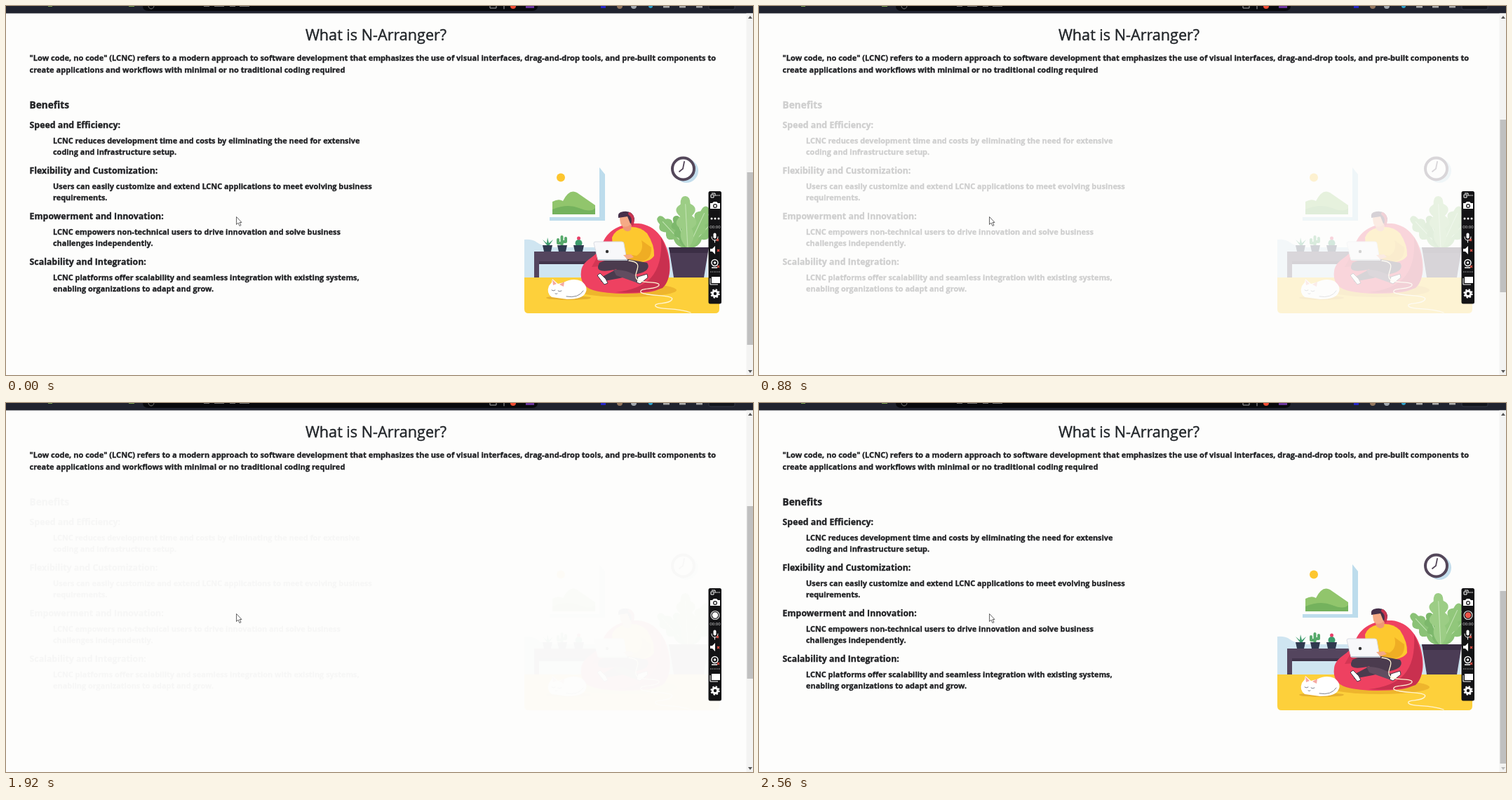
An HTML page for the animation above (2.6 s loop, 1065x526 px).

```html
<!DOCTYPE html>
<html lang="en">
<head>
<meta charset="utf-8">
<title>What is N-Arranger?</title>
<style>
html, body { margin: 0; width: 100%; height: 100%; overflow: hidden; background: #fdfdfc; }
svg { display: block; width: 1065px; height: 526px; }
text { font-family: "Open Sans", "Noto Sans", sans-serif; font-size: 10.54px; fill: #43464a; white-space: pre; }
.b, .h, .big { font-weight: 700; fill: #212225; stroke: #212225; stroke-width: .35px; }
.b { font-size: 10.93px; }
.lead { font-size: 11.08px; }
.h { font-size: 12.37px; }
.big { font-size: 13.7px; }
.title { font-size: 21.6px; fill: #212529; stroke: #212529; stroke-width: .4px; text-anchor: middle; }
.line { fill: none; stroke-linecap: round; stroke-linejoin: round; }
</style>
</head>
<body>
<svg viewBox="0 0 1065 526">
  <rect width="1065" height="526" fill="#fdfdfc"/>

  <!-- browser edge -->
  <rect width="1065" height="10.5" fill="#20232f"/>
  <path d="M195 0H758Q758 7 750 7H203Q195 7 195 0Z" fill="#08090d"/>
  <path d="M203 0a4 4 0 0 0 8 0" class="line" stroke="#777"/>
  <path d="M282 0h8M297 0h14M319 0h8M333 0h14" stroke="#777" stroke-width="2"/>
  <path d="M60 0h6M175 0h8" stroke="#7ca653" stroke-width="2"/>
  <path d="M690 0v3h9V0M710 0v4" class="line" stroke="#aaa"/>
  <circle cx="723" cy="0" r="4" fill="#ef4b32"/>
  <rect x="741" width="12" height="3" fill="#69349b"/>
  <rect x="848" width="7" height="3" fill="#2626c8"/>
  <circle cx="875" cy="0" r="4" fill="#94775e"/>
  <circle cx="895" cy="0" r="4" fill="#a2a8af"/>
  <circle cx="919" cy="0" r="3" fill="#2ba1cc"/>
  <path d="M937 1h9M960 1h9M984 1h9" stroke="#aaa" stroke-width="3"/>
  <path d="M1002 0v3q0 2 3 2h31q3 0 3-2V0" fill="#11141c" stroke="#343846"/>

  <text class="title" x="527.5" y="49">What is N-Arranger?</text>
  <text class="b lead" x="33.5" y="78">"Low code, no code" (LCNC) refers to a modern approach to software development that emphasizes the use of visual interfaces, drag-and-drop tools, and pre-built components to</text>
  <text class="b lead" x="33.5" y="94.7">create applications and workflows with minimal or no traditional coding required</text>

  <g id="benefits">
    <g id="benefitText"></g>
    <path d="M739 333Q750 332 757 337T778 344H1000V390H739Z" fill="#cfe5f1"/>
    <path d="M739 387H1017V432Q1017 438 1011 438H745Q739 438 739 432Z" fill="#fdd03b"/>
    <!-- wall picture and clock -->
    <path d="M775 306V301H846V230L854 240V306Z" fill="#bddcec"/>
    <path d="M779 297V279Q788 274 794 278Q803 260 814 266L840 284V297Z" fill="#91c56c"/>
    <path d="M779 290Q800 281 817 288T840 288V297H779Z" fill="#74b25d"/>
    <circle cx="791" cy="244.500" r="6" fill="#fdc62f"/>
    <circle cx="970" cy="235" r="17" fill="#c3deed"/>
    <circle cx="965.500" cy="232" r="15.500" fill="#fff" stroke="#54475a" stroke-width="4"/>
    <path d="M967 222L965 232L960 236" class="line" stroke="#54475a" stroke-width="1.800"/>
    <!-- plant -->
    <g id="plant"></g>
    <path d="M945 344H1002L995 387H952Z" fill="#4b3c55"/>
    <path d="M945 344H1002L1000 352H947Z" fill="#3b2e45"/>
    <!-- shelf -->
    <path d="M753 350H842V364H760V387H753Z" fill="#54455e"/>
    <path d="M760 364H842V368H760Z" fill="#41354b"/>
    <path d="M772 342l-7-9 6 5 1-8 2 8 6-5-6 9Z" fill="#3c9a6b"/>
    <path d="M792.500 342V329M793 338h-6v-5M793 336h5v-5" class="line" stroke="#57a96b" stroke-width="4"/>
    <circle cx="816.500" cy="338" r="5" fill="#3c9a6b"/>
    <circle cx="816.500" cy="331" r="2.500" fill="#e93f68"/>
    <path d="M765 341h14l-2 9h-10ZM786 341h14l-2 9h-10ZM809 341h15l-2 9h-11Z" fill="#30394f"/>
    <!-- bean bag -->
    <ellipse cx="884" cy="405" rx="72" ry="10" fill="#eeb52d"/>
    <path d="M820 378C822 361 842 359 849 342C857 317 880 309 902 310C926 312 943 334 946 363C949 390 940 405 916 408C891 411 857 411 837 405C824 401 818 391 820 378Z" fill="#ee4161"/>
    <path d="M934 330C949 360 950 390 936 402Q913 411 869 408C914 403 937 384 934 330Z" fill="#c9304f"/>
    <path d="M849 347Q859 337 874 338L860 370L835 372Z" fill="#d43654"/>
    <!-- reader -->
    <path d="M864 330Q868 319 882 316Q902 312 914 324Q925 341 924 356Q919 365 898 366L866 360Z" fill="#fdc82f"/>
    <path d="M906 334Q910 349 899 356L879 353L879 360L904 364Q921 363 920 344Z" fill="#efad24"/>
    <path d="M877 305h16l-2 14q-6 5-11-1Z" fill="#ef9876"/>
    <path d="M875 300Q877 295 887 297L893 307Q888 317 879 314Q875 312 875 300Z" fill="#f5aa86"/>
    <path d="M873 302Q871 294 880 293Q893 291 896 303Q895 313 890 310L886 300Z" fill="#46304a"/>
    <path d="M889 296Q896 301 893 311" class="line" stroke="#c83450" stroke-width="4"/>
    <path d="M846 366Q862 358 887 361L914 366Q921 377 900 382L875 388L848 393L850 386L871 375Q842 382 844 371Z" fill="#4b3b4e"/>
    <path d="M866 376Q889 375 908 391L901 395L870 384Z" fill="#614d60"/>
    <path d="M847 381l8 8 3 6-5 2-10-13ZM901 386l13-4 1 5-11 9-5-2Z" fill="#fff" stroke="#443645"/>
    <path d="M838 338Q838 336 841 336H878Q881 336 881 339L885 362H844Z" fill="#f8f8fa" stroke="#d9dbe2"/>
    <path d="M844 361H886V363H846Z" fill="#b9c1cb"/>
    <circle cx="857" cy="350" r="2.200" fill="#333"/>
    <path d="M880 355l11-1 4 4-9 3Z" fill="#f5aa86"/>
    <path d="M888 363C914 366 891 381 900 390C906 396 933 392 931 398C928 405 902 401 905 408C910 414 956 411 949 419C944 426 923 422 926 428C932 434 955 429 976 437" class="line" stroke="#fff4d2" stroke-width="1.300"/>
    <!-- cat -->
    <ellipse cx="802" cy="416" rx="32" ry="3" fill="#e6b12f"/>
    <path d="M774 399L778 394L779 389L787 396L795 394Q808 387 820 392Q831 400 826 409Q822 418 800 418L778 415Q770 409 774 399Z" fill="#fff"/>
    <path d="M779 390l1 8 5-2ZM789 397l7-4-1 7Z" fill="#f5a9a1"/>
    <path d="M778 405q2 2 5 0M787 406q2 2 5 0M783 410q2 1 3 0M799 414Q816 417 823 406" class="line" stroke="#737782" stroke-width=".9"/>
  </g>

  <g id="features">
    <g id="featureText"></g>
    <ellipse cx="860" cy="319" rx="82" ry="88" fill="#d9effc"/>
    <path d="M878 247C860 266 852 271 839 271C819 271 808 260 808 247C808 233 820 223 839 223C853 223 861 230 878 247" class="line" stroke="#7edbd0" stroke-width="8"/>
    <path d="M863 261C892 233 899 223 917 223C936 223 948 233 948 247C948 260 935 271 917 271C903 271 895 264 878 247" class="line" stroke="#83baf3" stroke-width="8"/>
    <!-- floating panels -->
    <path d="M740 304Q740 301 744 301L782 300Q785 300 786 303L792 318Q792 321 789 321H749Q747 321 746 318Z" fill="#2bbfc3"/>
    <circle cx="755" cy="308" r="4" fill="#287dc3"/>
    <path d="M749 316q6-7 13 0ZM766 307h17M768 312h17M769 317h15" fill="#287dc3" stroke="#d3f7f2"/>
    <path d="M758 328L795 326L808 362L772 363Z" fill="#f9a72e"/>
    <path d="M763 334h31M766 341h31M769 348h31M773 355h31M775 328l13 34M785 327l13 35" stroke="#fff0cd" stroke-width="1.500"/>
    <path d="M804 337L824 334L833 359L811 361Z" fill="#267dcc"/>
    <path d="M826 337L851 335L861 358L834 360Z" fill="#ffb442"/>
    <path d="M810 342l14-2M812 347l14-1M831 342l19-2M834 348l19-2M836 354l20-1" stroke="#fff" stroke-width="1.500"/>
    <path d="M840 318L862 315L868 328L846 330Z" fill="#faad36"/>
    <path d="M857 335L882 332L891 357L867 359Z" fill="#38b8c7"/>
    <path d="M863 340l18-2M866 347l18-2M869 353l18-2" stroke="#e2ffff" stroke-width="1.500"/>
    <path d="M833 310Q825 305 833 299Q834 291 843 294Q851 291 855 299Q866 300 864 307Q863 312 855 312Z" fill="#36c6bb"/>
    <g id="gears" class="line"></g>
    <!-- desk -->
    <path d="M750 373L925 367L990 378V391H822L751 385Z" fill="#86c2f0"/>
    <path d="M751 374L822 382V438H751Z" fill="#5aa4e4"/>
    <path d="M822 383H829V438H822Z" fill="#397fc2"/>
    <path d="M962 388H990V438H962Z" fill="#79b9eb"/>
    <path d="M783 369L834 360L894 363L912 376L833 382Z" fill="#6f61c7"/>
    <path d="M791 369L834 363L889 365L901 374L834 378Z" fill="#a69cec"/>
    <path d="M798 369l84 5M810 367l77 5M822 365l71 5M812 374l40-10M835 376l43-11" stroke="#766ac5" stroke-width="1.100"/>
    <path d="M783 369L833 382L912 376V379L833 385L783 372Z" fill="#4c409b"/>
    <!-- woman -->
    <path d="M967 284C961 267 979 257 990 265C1002 274 992 290 1003 304C1005 318 984 320 979 303C976 290 972 291 966 288Z" fill="#7c2668"/>
    <path d="M974 269Q988 266 987 284Q985 300 995 312" class="line" stroke="#983d83" stroke-width="3"/>
    <path d="M967 273q8 4 6 12" class="line" stroke="#28bba9" stroke-width="4"/>
    <path d="M914 288Q913 266 935 261Q960 258 971 275Q978 295 963 310Q952 318 940 313L917 298Z" fill="#6c205c"/>
    <path d="M872 414Q876 397 904 389L943 381L978 390Q982 419 957 424L910 420L908 438H877Q872 429 872 414Z" fill="#4d2080"/>
    <path d="M907 420Q909 405 944 401" class="line" stroke="#391760" stroke-width="1.500"/>
    <path d="M927 323L945 318L966 323Q987 345 984 390Q962 398 935 389L930 360L899 355L902 342L921 343Z" fill="#9c71c6"/>
    <path d="M937 305L956 303L957 322L943 329L932 321Z" fill="#e58f77"/>
    <path d="M919 282Q931 282 942 274Q953 279 957 292Q956 313 940 318Q924 317 919 303Z" fill="#f9b592"/>
    <path d="M915 288Q929 285 940 271Q949 281 956 301L968 295Q967 266 941 262Q917 264 915 288Z" fill="#85306f"/>
    <path d="M941 263Q958 270 961 289" class="line" stroke="#a04786" stroke-width="1.500"/>
    <ellipse cx="929" cy="294" rx="1.700" ry="2.300" fill="#452447"/>
    <ellipse cx="945" cy="293" rx="1.700" ry="2.300" fill="#452447"/>
    <path d="M925 289q3-2 6 0M942 288q3-2 6 0M936 297l-2 5 3 1" class="line" stroke="#763354"/>
    <path d="M929 306Q939 309 947 303Q944 313 937 313Q931 312 929 306Z" fill="#fff" stroke="#c9475f" stroke-width=".8"/>
    <path d="M961 333Q986 350 979 373Q964 382 922 378L903 374L905 362L948 359Z" fill="#b087d7"/>
    <path d="M951 359L905 362L903 374Q943 381 968 376" class="line" stroke="#7b54ab" stroke-width="1.200"/>
    <path d="M902 342L887 344L877 333L881 346L866 342L878 350L870 354L900 355ZM906 362L891 359L877 365L865 367L876 371L903 374Z" fill="#f5ae8b"/>
    <!-- chair -->
    <path d="M1003 309C985 319 991 350 984 377C979 405 960 415 932 423Q926 432 941 433H982Q1003 427 1003 397Z" fill="#17c4ae"/>
    <path d="M1003 318C992 345 1003 383 987 411Q977 426 932 426Q930 432 941 433H982Q1003 427 1003 397Z" fill="#10aaa0"/>
  </g>

  <!-- scrollbar -->
  <rect x="1055.500" y="10.500" width="9.500" height="515.500" fill="#f3f3f2"/>
  <rect id="thumb" x="1056.500" width="8.500" height="246" fill="#c0c0c0"/>
  <path id="up" d="M1058 18l3-4 3 4Z"/>
  <path id="down" d="M1058 519l3 4 3-4Z"/>

  <path d="M328.500 300.500V311.500L331 309L333 313.500L335 312.500L333 308.500H336Z" fill="#fff" stroke="#555" stroke-width=".9"/>

  <!-- recorder -->
  <rect x="1001.500" y="264" width="18.500" height="160.500" rx="2.500" fill="#131315"/>
  <g fill="#fff">
    <path d="M1005 269h4v4h-4ZM1006 267h5v4" fill="none" stroke="#fff"/>
    <path d="M1012 270h6" stroke="#bbb" stroke-width="1.500" stroke-dasharray="1.500 .8"/>
    <path d="M1004 281h3l2-2h4l2 2h3v8h-14Z"/>
    <circle cx="1011" cy="285" r="2.400" fill="#fff" stroke="#131315" stroke-width="1.200"/>
    <g id="dots"><circle cx="1006" cy="303" r="1.500"/><circle cx="1011" cy="303" r="1.500"/><circle cx="1016" cy="303" r="1.500"/></g>
    <g id="record"><circle cx="1011" cy="302.500" r="6" fill="none" stroke="#ddd" stroke-width="1.200"/><circle id="light" cx="1011" cy="302.500" r="4.200"/></g>
    <text x="1011" y="317" text-anchor="middle" style="font-size:6px;fill:#ddd">00:00</text>
    <rect x="1008.500" y="323.500" width="4" height="8" rx="2"/>
    <path d="M1006 329q0 5 4.500 5t4.500-5M1010.500 334v3" class="line" stroke="#fff"/>
    <path d="M1004 346h3l4-4v12l-4-4h-3Z"/>
    <path d="M1013 332l3 3m0-3l-3 3M1014 347l3 3m0-3l-3 3M1014 370l3 3m0-3l-3 3" stroke="#ee5548" stroke-width="1.100"/>
    <circle cx="1010.500" cy="366" r="4.500" fill="none" stroke="#fff" stroke-width="1.500"/>
    <circle cx="1010.500" cy="366" r="1.800"/>
    <path d="M1006 373h8" stroke="#fff" stroke-width="1.500"/>
    <path d="M1004 379h14" stroke="#aaa" stroke-dasharray="1.500 1"/>
    <path d="M1006 386h12v9h-12Z"/>
    <path d="M1004 388v9h11" fill="none" stroke="#fff"/>
    <circle cx="1011" cy="410" r="3.700" fill="none" stroke="#fff" stroke-width="3"/>
    <circle cx="1011" cy="410" r="5.800" fill="none" stroke="#fff" stroke-width="1.800" stroke-dasharray="2.300 2.255"/>
  </g>
</svg>
<script>
const $ = id => document.getElementById(id);
const label = (x, y, text, kind = "") => `<text x="${x}" y="${y}" class="${kind}">${text}</text>`;

const benefits = [
  ["Speed and Efficiency:", "LCNC reduces development time and costs by eliminating the need for extensive", "coding and infrastructure setup."],
  ["Flexibility and Customization:", "Users can easily customize and extend LCNC applications to meet evolving business", "requirements."],
  ["Empowerment and Innovation:", "LCNC empowers non-technical users to drive innovation and solve business", "challenges independently."],
  ["Scalability and Integration:", "LCNC platforms offer scalability and seamless integration with existing systems,", "enabling organizations to adapt and grow."]
];
const features = [
  ["Visual Development Environment:", "LCNC platforms provide intuitive, drag-and-drop interfaces that enable users to design and", "build applications visually, without writing code."],
  ["Pre-built Components and Templates:", "LCNC platforms offer a library of pre-built components, templates, and integrations that users", "can easily incorporate into their applications or workflows."],
  ["Workflow Automation:", "Users can automate repetitive tasks and streamline complex workflows by visually designing", "sequences of actions and triggers."],
  ["Empowerment of Citizen Developers:", "LCNC platforms democratize software development by enabling individuals with domain", "expertise, but limited coding experience, to create custom solutions tailored to their specific", "needs."],
  ["Rapid Prototyping and Iteration:", "LCNC empowers users to quickly prototype ideas, experiment with different features, and", "iterate based on feedback, accelerating the development process."]
];

$("benefitText").innerHTML = label(33.5, 146, "Benefits", "big") + benefits.map(([head, ...lines], i) =>
  label(33.5, 174.3 + 65 * i, head, "h") +
  lines.map((line, j) => label(67, 195.6 + 65 * i + 16.7 * j, line, "b")).join("")).join("");

let row = 0;
$("featureText").innerHTML = label(33.5, 141.4, "Key Features", "h") + features.map(([head, ...lines], i) => {
  const y = () => 170 + 16.68 * row++;
  const top = y();
  return label(33.5, top + .5, i + 1 + ".") + label(42, top, head, "h") +
    lines.map(line => label(67, y() + .8, line)).join("");
}).join("");

// Half of a lobed leaf, mirrored; w is the signed width and l the length.
const half = (w, l) => `M0 0Q${w} ${-l * .2} ${w * .5} ${-l * .38}Q${w * 1.5} ${-l * .48} ${w * .6} ${-l * .62}Q${w * 1.4} ${-l * .76} ${w * .5} ${-l * .85}Q${w * .5} ${-l} 0 ${-l}Z`;
const leaf = ([angle, l, w, color]) =>
  `<g transform="translate(972 346) rotate(${angle})"><path d="${half(w, l)}${half(-w, l)}" fill="${color}"/><path d="M0 0V${-l * .85}" stroke="#c5e5b5"/></g>`;
$("plant").innerHTML = [
  [-43, 62, 11, "#8ac276"], [43, 61, 11, "#8ac276"], [-21, 50, 11, "#7db86c"],
  [25, 66, 12, "#91c77b"], [-3, 75, 14, "#9ccd85"]
].map(leaf).join("");

const gear = ([x, y, r, color]) =>
  `<circle cx="${x}" cy="${y}" r="${r}" stroke="${color}" stroke-width="${r * .65}"/>` +
  `<circle cx="${x}" cy="${y}" r="${r * 1.4}" stroke="${color}" stroke-width="${r * .5}" stroke-linecap="butt" stroke-dasharray="${r * .55}"/>`;
$("gears").innerHTML = [[802, 308, 5, "#2876c5"], [817, 307, 3, "#287fc7"], [824, 322, 8, "#2aabb8"]].map(gear).join("");

// Scrollbar position over time; scrolling also cross-fades the two panels.
const stops = [[0, 237], [120, 254], [240, 264], [360, 268], [520, 268], [580, 260], [640, 243], [880, 162], [1160, 57], [1240, 33], [1320, 23], [1520, 23], [1640, 47], [1800, 107], [1920, 147], [2080, 190], [2240, 230], [2400, 259], [2520, 268], [2600, 268]];
const scrollAt = t => {
  const i = stops.findIndex(stop => stop[0] > t);
  const [t0, y0] = stops[i - 1], [t1, y1] = stops[i];
  return y0 + (y1 - y0) * (t - t0) / (t1 - t0);
};
const fade = distance => Math.max(0, Math.min(1, distance / 82));
const start = performance.now();

function draw(now) {
  const t = Math.floor(Math.max(0, now - start) % 2600 / 40) * 40;
  const y = scrollAt(t);
  $("thumb").setAttribute("y", y);
  $("benefits").style.opacity = fade(y - 145);
  $("features").style.opacity = fade(145 - y);
  $("up").setAttribute("fill", y <= 23 ? "#bbb" : "#555");
  $("down").setAttribute("fill", y >= 268 ? "#bbb" : "#555");
  $("dots").style.display = t < 1120 ? "" : "none";
  $("record").style.display = t < 1120 ? "none" : "";
  $("light").setAttribute("fill", t < 2320 ? "#fff" : "#ee5548");
  requestAnimationFrame(draw);
}
draw(start);
</script>
</body>
</html>
```
